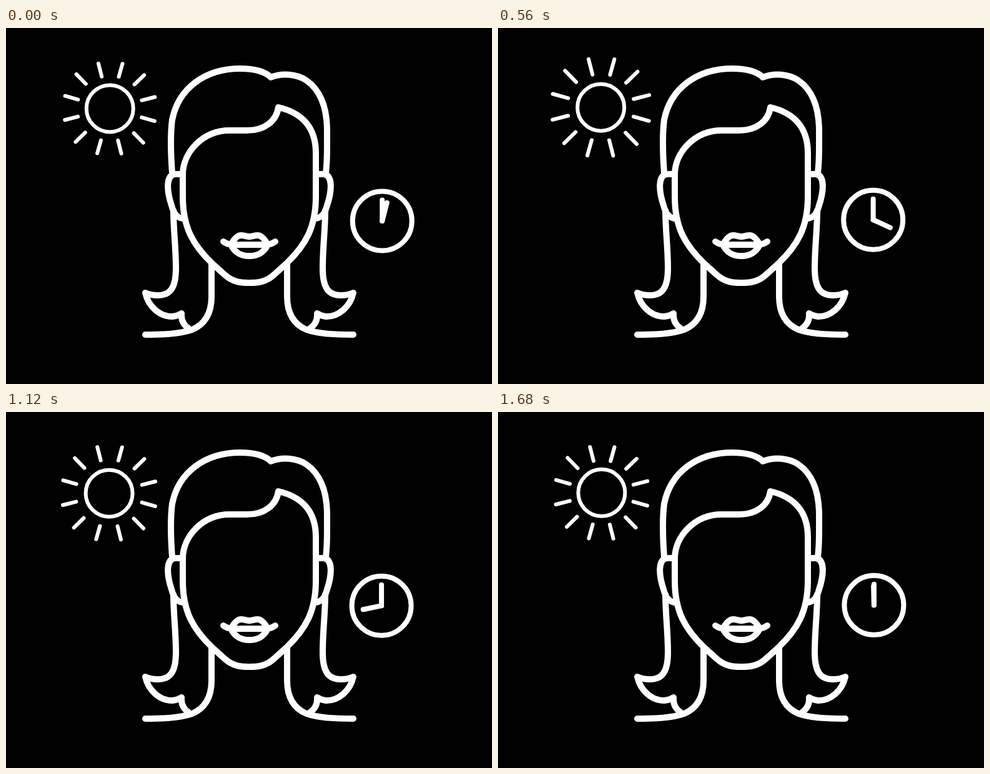
Recreate the animation shown at these times as an HTML page. Size 778 px wide and 570 px high, loop 1800 ms.

```html
<!DOCTYPE html>
<html lang="en">
<head>
<meta charset="utf-8">
<style>
  html, body { margin: 0; height: 100%; overflow: hidden; background: #000; }
  svg { display: block; width: 778px; height: 570px; fill: none; stroke: #fff; stroke-linecap: round; stroke-linejoin: round; }
</style>
</head>
<body>
<svg viewBox="0 0 778 570">
  <g stroke-width="10">
    <g id="half">
      <!-- ear, hair strand, neck, jaw, lips -->
      <path d="M282 234H270C256 236 257 260 265 284C268 296 273 304 284 305"/>
      <path d="M268 292C268 325 272 350 272 385C272 416 263 428 243 428Q232 428 223 424C228 446 246 462 266 462Q275 461 281 457C280 470 286 477 295 483"/>
      <path d="M329 378V430C329 456 319 474 298 483C277 490 252 491 223 491"/>
      <path d="M283 235V270C283 320 300 348 330 377L350 395C362 406 374 408 389.5 408"/>
      <path d="M348 342Q355 347 364 347H389.5M360 347C365 338 370 332 376 332S385 334 389.5 334M360 347C367 361 377 365 389.5 365"/>
    </g>
    <use href="#half" transform="matrix(-1 0 0 1 779 0)"/>
    <path d="M266 232C264 205 263 170 266 147C276 97 318 65 375 65C397 65 414 69 424 79C441 72 465 73 481 84C504 100 513 127 514 160V190Q514 215 512 232"/>
    <path d="M283 235C283 199 315 164 358 164H386C414 164 433 149 436 127C475 136 496 160 496 200V235"/>
  </g>
  <g id="sun" stroke-width="6">
    <circle r="37.5"/>
    <path id="rays"/>
  </g>
  <g id="clock" stroke-width="8">
    <circle r="47.5"/>
    <path d="M0 0V-33.5"/>
    <path id="hand" d="M0 0V-30"/>
  </g>
</svg>
<script>
const LOOP = 1800, STEP = 40, LAST = 1680, TAU = 2 * Math.PI;
const set = (id, name, value) => document.getElementById(id).setAttribute(name, value);
const wave = (t, period, peak) => Math.cos(TAU * (t - peak) / period);

// Twelve rays; the diagonal ones sit slightly further out
function rayPath(inner, outer) {
  let d = '';
  for (let k = 0; k < 12; k++) {
    const a = (15.7 + 30 * k) * TAU / 360, push = -1.5 * Math.cos(4 * a);
    const point = r => `${(r + push) * Math.cos(a)} ${(r + push) * Math.sin(a)}`;
    d += `M${point(inner)}L${point(outer)}`;
  }
  return d;
}

function draw(now) {
  let t = Math.min(Math.floor(now % LOOP / STEP) * STEP, LAST);
  if (t < 2 * STEP) t = 0;
  const dx = -1.3 + 1.5 * wave(t, 1300, 160);
  const dy = 0.3 + 1.8 * wave(t, 1750, 1325);
  set('sun', 'transform', `translate(${166.5 + dx} ${128.5 + dy})`);
  set('clock', 'transform', `translate(${602.5 + dx} ${308.5 + dy})`);
  // One turn per loop, fastest at the bottom
  set('hand', 'transform', `rotate(${18.5 + 360 * t / LOOP - 19 * wave(t, LOOP, 390)})`);
  set('rays', 'd', rayPath(54.7 + 2 * wave(t, 1300, 850), 78 + 3 * wave(t, 1500, 680)));
}

const start = performance.now();
function tick() {
  draw(performance.now() - start);
  requestAnimationFrame(tick);
}
tick();
</script>
</body>
</html>
```
